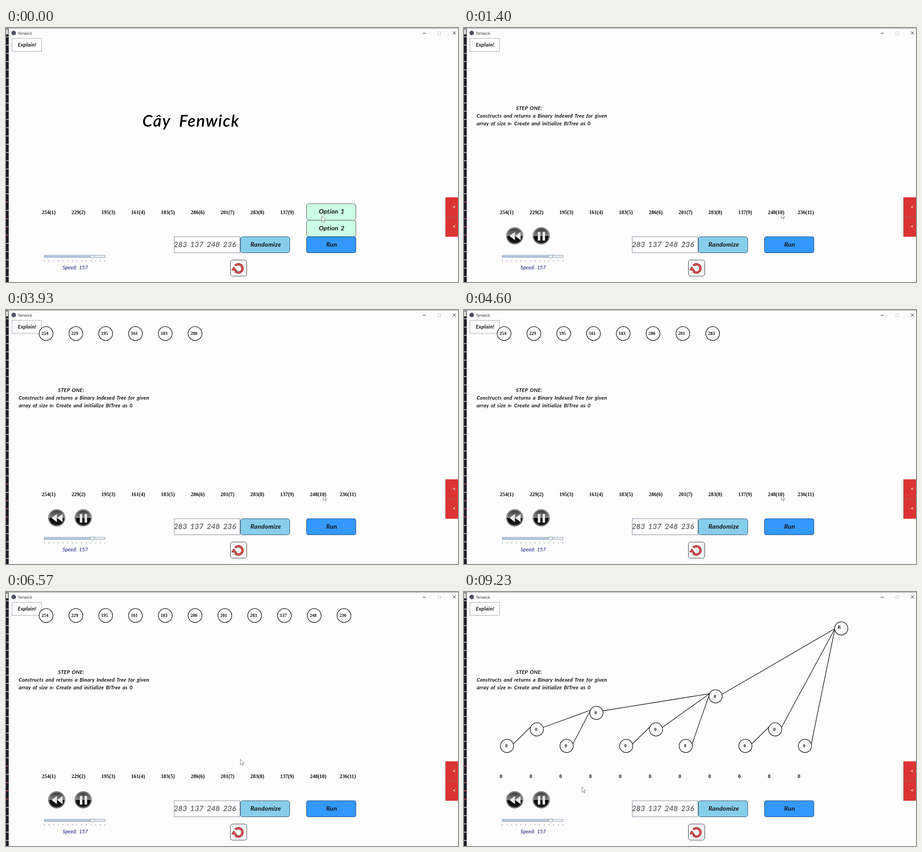
Recreate the animation shown at these times as an HTML page. Size 998 by 561 pixels, loop 9260 ms.

```html
<!DOCTYPE html>
<html lang="en">
<head>
<meta charset="utf-8">
<title>fenwick</title>
<style>
html, body { margin: 0; width: 100%; height: 100%; overflow: hidden; background: #fdfdfd; }
svg { display: block; width: 998px; height: 561px; }
text { white-space: pre; }
.hand { font: italic 700 11.5px Lato, "Open Sans", sans-serif; word-spacing: 1.5px; letter-spacing: .27px; fill: #111; }
.big { font-size: 14px; word-spacing: 2px; }
.title { font-size: 36px; font-weight: 600; word-spacing: 9px; letter-spacing: 1.6px; fill: #000; }
.speed { font-weight: 400; letter-spacing: 0; fill: #181888; }
.entry { font-size: 17px; word-spacing: 3px; letter-spacing: 0; fill: #707070; }
.light { fill: #fff; }
.num { font: 700 11.5px "Liberation Serif", serif; fill: #111; }
.small { font-size: 10px; }
.mid { text-anchor: middle; }
.node { fill: #fdfdfd; stroke: #111; stroke-width: 1.3; }
.edge { stroke: #111; stroke-width: 1.3; }
</style>
</head>
<body>
<svg viewBox="0 0 998 561">
  <defs>
    <linearGradient id="gloss" x2="0" y2="1">
      <stop offset="0" stop-color="#333"/>
      <stop offset=".5" stop-color="#858585"/>
      <stop offset=".52" stop-color="#080808"/>
      <stop offset="1" stop-color="#1c1c1c"/>
    </linearGradient>
    <clipPath id="field"><rect x="372" y="462" width="144" height="34"/></clipPath>
  </defs>
  <rect width="998" height="561" fill="#fdfdfd"/>

  <g id="strip"><rect width="6" height="561" fill="#1e1e28"/></g>
  <path d="M5 .5H998" stroke="#8a8a8a"/>
  <circle cx="17" cy="11" r="5" fill="#4a4f63"/>
  <text x="27" y="14.5" font-family="Open Sans, sans-serif" font-size="8.6" fill="#333">fenwick</text>
  <path d="M920 11.5h7M986.5 7.5l7 7m0-7l-7 7" stroke="#222" fill="none"/>
  <rect x="953.5" y="8.5" width="6" height="6" fill="none" stroke="#ccc"/>

  <rect x="13" y="23" width="65.5" height="28.5" fill="#fff" stroke="#a2a2b4"/>
  <text class="hand mid" x="46.5" y="41">Explain!</text>

  <text id="title" class="hand title" x="301" y="218">Cây Fenwick</text>
  <g id="step">
    <text class="hand" x="115" y="181">STEP ONE:</text>
    <text class="hand" x="28" y="198">Constructs and returns a Binary Indexed Tree for given</text>
    <text class="hand" x="28" y="214.5">array of size n· Create and initialize BITree as 0</text>
  </g>

  <g id="top"></g>
  <g id="labels"></g>
  <g id="tree"></g>

  <g id="options">
    <g fill="#ccffe5" stroke="#4a5550">
      <rect x="663.5" y="388" width="109" height="36.5" rx="5"/>
      <rect x="663.5" y="424.5" width="109" height="36.5" rx="5"/>
    </g>
    <text class="hand big mid" x="719" y="410">Option 1</text>
    <text class="hand big mid" x="719" y="446.5">Option 2</text>
  </g>

  <rect x="663.5" y="461" width="109" height="35.5" rx="4" fill="#3399ff" stroke="#1d3d70"/>
  <text class="hand big mid" x="719" y="483">Run</text>
  <rect x="517.5" y="461" width="109" height="35.5" rx="5" fill="#87ceeb" stroke="#2c4a66"/>
  <text class="hand big mid" x="573.5" y="483">Randomize</text>
  <rect x="371.5" y="461" width="145" height="35.5" fill="#fff" stroke="#85859c"/>
  <g clip-path="url(#field)">
    <text class="hand entry" x="508" y="484" text-anchor="end">283 137 248 236</text>
  </g>

  <g id="player">
    <g fill="url(#gloss)" stroke="#222" stroke-width=".8">
      <circle cx="112" cy="459" r="18.3"/>
      <circle cx="170.5" cy="459" r="18.3"/>
    </g>
    <g fill="none" stroke="#d8d8d8">
      <circle cx="112" cy="459" r="17.2"/>
      <circle cx="170.5" cy="459" r="17.2"/>
    </g>
    <path d="M112.500 450.5v18l-12-9zM125 450.5v18l-12-9zM163 450.5h5.500v19H163zM173.5 450.5h5.500v19H173.5z" fill="#e8e8e8"/>
  </g>

  <g id="slider">
    <rect x="84.5" y="502" width="134" height="4.5" fill="#f4f6f9" stroke="#8492a4"/>
    <rect x="85" y="502.5" width="105" height="3.5" fill="#b3cbe4"/>
    <path d="M186.5 501.500h9v4l-4.500 4-4.500-4z" fill="#edf2f8" stroke="#8492a4"/>
  </g>
  <text class="hand speed" x="125" y="532.5">Speed: 157</text>

  <rect x="495.5" y="512.5" width="36" height="35.5" rx="5" fill="#fff" stroke="#333"/>
  <g id="ring" fill="none"></g>
  <path d="M503 527l-5 7.500 12 2z" fill="#de4b4b" stroke="#552020" stroke-width=".8"/>
  <path d="M501 518h1m22-1h1m2 9h1m-2 13h1m-20 5h1m11 0h1m-18-3h1" stroke="#444"/>

  <rect x="970" y="374" width="28" height="87" fill="#dc3434"/>
  <path d="M970 417.5h28M970.5 374v87" stroke="#a85a5a"/>
  <text class="hand light mid" x="989.5" y="399">&lt;</text>
  <text class="hand light mid" x="989.5" y="442">&lt;</text>

  <path id="cursor" d="M.5.5V12.500L3.300 10l2 4.200 1.800-.8-2-4.200H8.500z" fill="#fff" stroke="#777" stroke-width=".9"/>
</svg>
<script>
const LOOP = 9260, CLICK = 600, FIRST = 1850, GAP = 350, BUILD = 8800;
const STEP = 65.78;
const values = [254, 229, 195, 161, 183, 286, 201, 283, 137, 248, 236];
// time, x, y
const path = [
  [0, 697, 415], [500, 697, 415], [900, 700, 408], [5700, 700, 408],
  [6500, 517, 369], [7500, 517, 369], [8200, 515, 391], [8400, 515, 391],
  [9100, 260, 430], [LOOP, 260, 430]
];

const $ = id => document.getElementById(id);
const show = (el, on) => { el.style.display = on ? "" : "none"; };

function add(parent, tag, attrs, text) {
  const el = document.createElementNS("http://www.w3.org/2000/svg", tag);
  for (const k in attrs) el.setAttribute(k, attrs[k]);
  if (text !== undefined) el.textContent = text;
  return parent.appendChild(el);
}

// screen edge left of the window
for (let y = 0.5; y < 561; y += 18.25)
  add($("strip"), "rect", { y, width: 6, height: 1.4, fill: "#e4e4e8" });
add($("strip"), "rect", { y: 3, width: 5, height: 11, fill: "#d8d8d2" });
for (const y of [384, 420, 439, 457])
  add($("strip"), "rect", { y, width: 6.5, height: 1.3, fill: "#c03030" });

for (let i = 0; i < 14; i++)
  add($("slider"), "path", { d: `M${84.5 + i * 10.31} 513v2.5`, stroke: "#666" });

// reset icon: a dark arc under a thinner red one
const polar = deg => {
  const a = deg * Math.PI / 180;
  return `${513 + 9.2 * Math.cos(a)} ${531 + 9.2 * Math.sin(a)}`;
};
const arc = `M${polar(222)}A9.2 9.2 0 1 1 ${polar(140)}`;
add($("ring"), "path", { d: arc, stroke: "#552020", "stroke-width": 5 });
add($("ring"), "path", { d: arc, stroke: "#de4b4b", "stroke-width": 3.6 });

const circles = values.map((v, i) => {
  const g = add($("top"), "g", {});
  add(g, "circle", { class: "node", cx: 88.5 + i * STEP, cy: 52, r: 15.3 });
  add(g, "text", { class: "num small", x: 78.5 + i * STEP, y: 55 }, v);
  return g;
});
const labels = values.map((v, i) =>
  add($("labels"), "text", { class: "num", x: 79 + i * STEP, y: 411 }));

// Fenwick tree: the parent of n is n plus its lowest set bit
const root = { x: 833, y: 80.5 };
const place = n => n > 11 ? root :
  { x: 95 + (n - 1) * STEP, y: 340 - 36.5 * Math.log2(n & -n) };
values.forEach((_, i) => {
  const n = i + 1, a = place(n), b = place(n + (n & -n));
  const end = b === root ? [-14, 0.5] : [-13, -6];
  add($("tree"), "line", { class: "edge", x1: a.x + 14, y1: a.y - 4.5, x2: b.x + end[0], y2: b.y + end[1] });
});
for (let n = 1; n <= 12; n++) {
  const p = place(n), top = p === root;
  add($("tree"), "circle", { class: "node", cx: p.x, cy: p.y, r: 14.6 });
  add($("tree"), "text", { class: "num mid small", x: p.x - (top ? 4.5 : 1.5), y: p.y + (top ? 0.5 : 3.3) }, top ? "R" : 0);
}

function cursorAt(t) {
  const k = path.findIndex(p => p[0] > t);
  const [t0, x0, y0] = path[k - 1], [t1, x1, y1] = path[k];
  const u = (t - t0) / (t1 - t0), e = u * u * (3 - 2 * u);
  return [x0 + (x1 - x0) * e, y0 + (y1 - y0) * e];
}

function draw(t) {
  const started = t >= CLICK, built = t >= BUILD;
  for (const id of ["title", "options"]) show($(id), !started);
  for (const id of ["step", "player"]) show($(id), started);
  show($("tree"), built);
  circles.forEach((c, i) => show(c, !built && t >= FIRST + i * GAP));
  labels.forEach((l, i) => { l.textContent = built ? "0" : `${values[i]}(${i + 1})`; });
  $("cursor").setAttribute("transform", `translate(${cursorAt(t)})`);
}

const start = performance.now();
function tick() {
  draw((performance.now() - start) % LOOP);
  requestAnimationFrame(tick);
}
draw(0);
requestAnimationFrame(tick);
</script>
</body>
</html>
```
